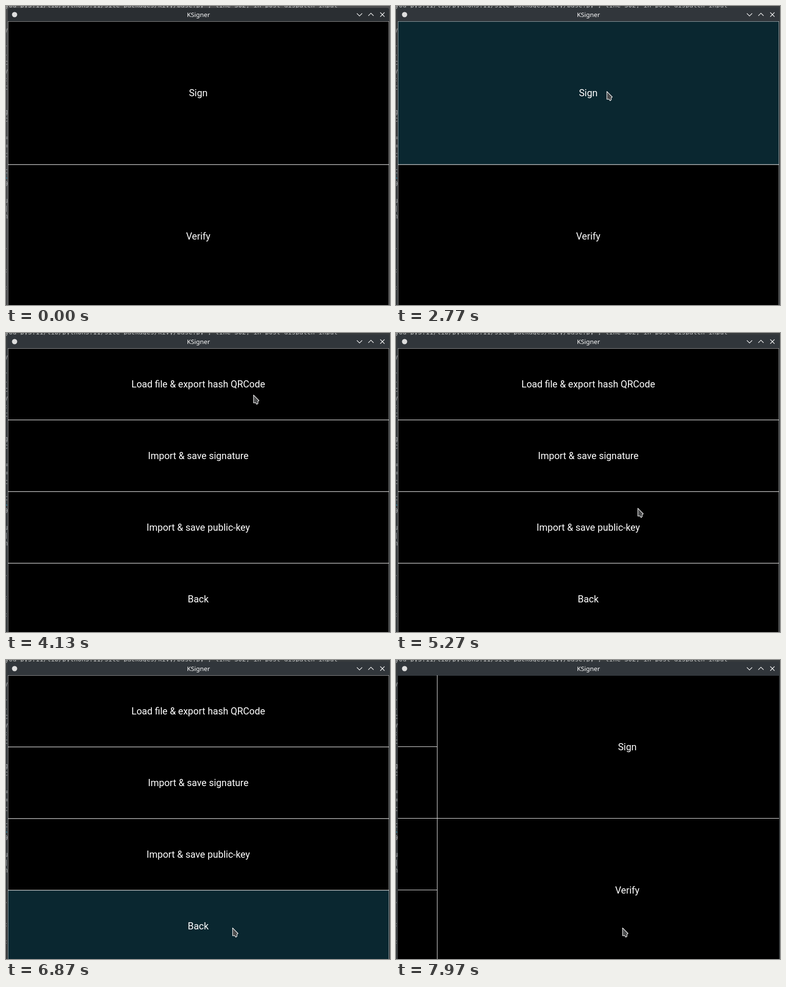
An HTML page that plays this animation: 806x626 px, repeating every 8 s.

```html
<!DOCTYPE html>
<html lang="en">
<head>
<meta charset="utf-8">
<title>KSigner</title>
<style>
html, body { margin: 0; width: 100%; height: 100%; overflow: hidden; background: #000; }
svg { display: block; width: 806px; height: 626px; }
.menu text { font: 20px Roboto, sans-serif; fill: #fff; text-anchor: middle; }
.title { font: 13.33px "Noto Sans", sans-serif; fill: #fcfcfc; text-anchor: middle; }
.term text { font: 13.33px "DejaVu Sans Mono", monospace; fill: #a6a8a9; white-space: pre; }
.icons { fill: none; stroke: #fcfcfc; stroke-width: 1.2; }
</style>
</head>
<body>
<svg id="stage" viewBox="0 0 806 626">
  <defs>
    <clipPath id="client"><rect x="4" y="32" width="800" height="594"/></clipPath>
  </defs>
  <rect id="back" width="806" height="626"/>
  <g class="term" id="term">
    <text x="-2" y="3" style="fill:#bcbebf">you-py3.11/lib/python3.11/site-packages/kivy/base.py", line 302, in post_dispatch_input</text>
  </g>
  <path id="bar" d="M4 32V8Q4 4 8 4H800Q804 4 804 8V32Z"/>
  <circle cx="18" cy="18" r="5.5" fill="#dedede"/>
  <text class="title" x="404" y="23">KSigner</text>
  <path class="icons" d="M736.5 15.5l5.5 5.5 5.5-5.5M760.5 20.5l5.5-5.5 5.5 5.5M785.5 13.5l9 9m0-9l-9 9"/>
  <rect x="4" y="32" width="800" height="594"/>
  <g clip-path="url(#client)" id="client-area"></g>
  <path id="cursor" d="M.6 .8L12 12.5 9.6 14.5 10 18 7.5 20.4 5 17 .6 17.2Z"
        fill="#4b4c4d" stroke="#fff" stroke-width="1.1" stroke-linejoin="round"/>
</svg>
<script>
const LOOP = 8000, W = 800, TOP = 32, H = 600;
const $ = id => document.getElementById(id);

function add(parent, tag, attrs, text) {
  const el = document.createElementNS('http://www.w3.org/2000/svg', tag);
  for (const k in attrs) el.setAttribute(k, attrs[k]);
  if (text) el.textContent = text;
  parent.append(el);
  return el;
}

// Edges of terminal text that show beside the window
const scraps = [[51, 'y'], [84, '-'], [100, '.'], [119, 'c'], [137, 'y'], [154, ':'], [171, 't'],
  [222, 'g'], [238, 'c'], [277, '='], [294, '='], [312, 't'], [346, 't'], [357, 'l', '#2f9fc4'],
  [373, '9'], [408, 'u'], [425, ']'], [441, 'n'], [505, '.'], [554, ':'], [590, ':']];
for (const [y, ch, fill] of scraps)
  add($('term'), 'text', { x: -4, y: y + 4, style: fill ? `fill:${fill}` : '' }, ch);

// Borders are soft while a menu rests and one crisp pixel while it slides
function makeMenu(labels) {
  const root = add($('client-area'), 'g', { class: 'menu' });
  const h = H / labels.length;
  const rows = labels.map((_, i) => add(root, 'rect', { x: 4, y: TOP + i * h, width: W, height: h }));
  const still = add(root, 'g', { fill: '#fff', 'fill-opacity': .55 });
  const sliding = add(root, 'g', { fill: '#f4f4f4' });
  const line = (g, x, y, width, height) => add(g, 'rect', { x, y, width, height });
  line(still, 4, TOP, W, 1);
  line(still, 4, TOP, 1, H);
  line(still, 803, TOP, 1, H);
  line(sliding, 4, TOP, W, 1).setAttribute('fill', '#31363b');
  line(sliding, 4, TOP, 1, H);
  labels.forEach((label, i) => {
    const y = TOP + i * h;
    if (i) {
      line(still, 4, y - 1, W, 2);
      line(sliding, 4, y - 1, W, 1);
    }
    add(root, 'text', { x: 403.5, y: y + h / 2 + 7 }, label);
  });
  return { root, rows, still, sliding };
}

function place(menu, x, pressed) {
  menu.root.style.display = Math.abs(x) < W ? '' : 'none';
  menu.root.setAttribute('transform', `translate(${Math.round(x)} 0)`);
  menu.still.style.display = x ? 'none' : '';
  menu.sliding.style.display = x ? '' : 'none';
  menu.rows.forEach((r, i) => r.setAttribute('fill', i === pressed ? '#0a2730' : '#000'));
}

const home = makeMenu(['Sign', 'Verify']);
const sign = makeMenu(['Load file & export hash QRCode', 'Import & save signature',
  'Import & save public-key', 'Back']);

// Pointer stops: time, x, y
const path = [
  [830, 461, 577], [1000, 415, 470], [1200, 358, 320], [1350, 368, 240], [1465, 386, 210],
  [2370, 386, 210], [2530, 442, 178], [3700, 442, 178],
  [3900, 470, 146], [4130, 519, 129], [4330, 512, 128], [4530, 476, 150],
  [4700, 456, 190], [4860, 500, 236], [5020, 538, 285], [5150, 521, 330],
  [5266, 507, 366], [5380, 510, 385], [5640, 533, 435], [5920, 532, 500],
  [6200, 510, 550], [6500, 475, 560]];

// Smooth curve through the stops that never overshoots them
function pointer(t) {
  const n = path.length - 1;
  if (t >= path[n][0]) return path[n].slice(1);
  const i = path.findIndex(p => p[0] > t) - 1;
  const a = path[i], b = path[i + 1], d = b[0] - a[0], u = (t - a[0]) / d, v = 1 - u;
  const slope = (k, c) => {
    const p = path[k - 1], m = path[k], q = path[k + 1];
    if (!p || !q) return 0;
    const before = (m[c] - p[c]) / (m[0] - p[0]), after = (q[c] - m[c]) / (q[0] - m[0]);
    return before * after > 0 ? 2 * before * after / (before + after) : 0;
  };
  return [1, 2].map(c => v * v * (1 + 2 * u) * a[c] + u * u * (3 - 2 * u) * b[c]
    + d * u * v * (v * slope(i, c) - u * slope(i + 1, c)));
}

const clamp = x => Math.min(1, Math.max(0, x));
// Distance left to slide, with a quadratic ease-out over 400 ms
const left = (t, start) => W * (1 - clamp((t - start) / 400)) ** 2;
const slideIn = 3018.3, slideBack = 7694.7;

function draw(t) {
  const fade = clamp((t - 200) / 400);
  const mix = (a, b) => Math.round(a + (b - a) * fade);
  $('back').setAttribute('fill', `rgb(${mix(77, 55)},${mix(78, 59)},${mix(79, 61)})`);
  $('bar').setAttribute('fill', t < 1900 ? '#2a2e32' : '#31363b');

  const back = t >= slideBack;
  const x = left(t, back ? slideBack : slideIn);
  const [from, to] = back ? [sign, home] : [home, sign];
  place(from, x - W, t >= 2760 && t < 3000 ? 0 : -1);
  place(to, x, t >= 6860 && t < 7660 ? 3 : -1);

  const shown = t >= path[0][0];
  $('cursor').style.display = shown ? '' : 'none';
  if (shown) $('cursor').setAttribute('transform', `translate(${pointer(t).map(Math.round)})`);
}

const begin = performance.now();
function tick() {
  const t = (performance.now() - begin) % LOOP;
  draw(Math.floor((t + 5) * .03) * 100 / 3);
  requestAnimationFrame(tick);
}
tick();
</script>
</body>
</html>
```
